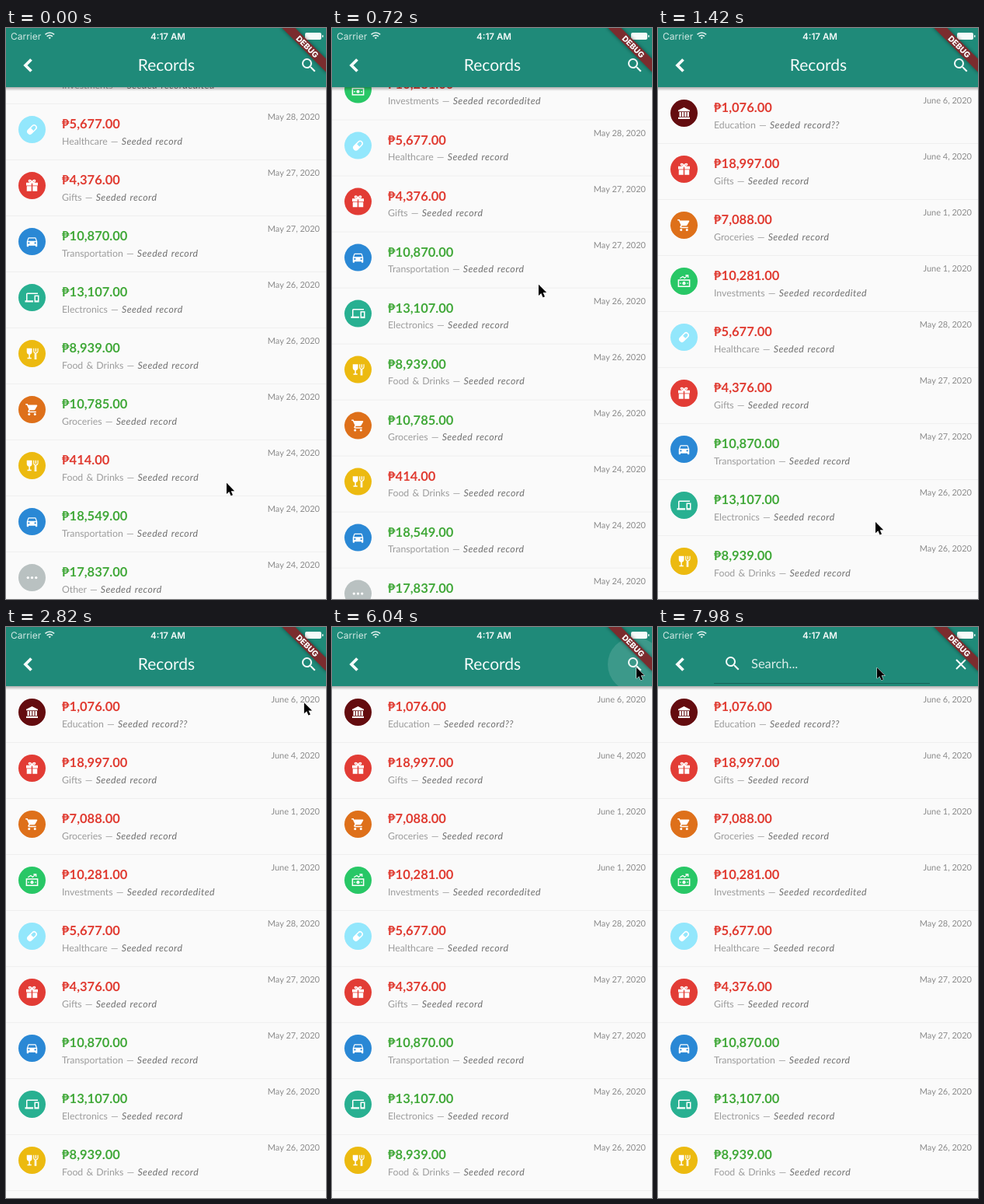
An HTML page for the animation above (8000 ms loop, 412 by 734 pixels).

```html
<!DOCTYPE html>
<html lang="en">
<head>
<meta charset="utf-8">
<title>Records</title>
<style>
  html, body { margin: 0; width: 100%; height: 100%; overflow: hidden; background: #fafafa; }
  svg { display: block; width: 412px; height: 734px; }
  text { font-family: Lato, "Open Sans", sans-serif; text-rendering: geometricPrecision; white-space: pre; }
  .amount { font-size: 16.5px; font-weight: 700; }
  .note { font-size: 12.3px; word-spacing: 1px; fill: #9c9c9c; }
  .note .desc { font-style: italic; letter-spacing: .45px; fill: #727272; }
  .date { font-size: 11px; fill: #8b8b8b; text-anchor: end; }
  .status { font-family: Inter, Roboto, sans-serif; }
  .banner { filter: drop-shadow(0 0 2.5px #0007); }
</style>
</head>
<body>
<svg viewBox="0 0 412 734" xmlns="http://www.w3.org/2000/svg">
  <defs>
    <linearGradient id="shade" x2="0" y2="1">
      <stop stop-color="#000" stop-opacity=".3"/>
      <stop offset="1" stop-color="#000" stop-opacity="0"/>
    </linearGradient>
    <clipPath id="bar"><path d="M0 0H412V76H0z"/></clipPath>
    <path id="magnifier" d="M15.5 14h-.79l-.28-.27A6.47 6.47 0 0 0 16 9.5 6.5 6.5 0 1 0 9.5 16c1.61 0 3.09-.59 4.23-1.57l.27.28v.79l5 4.99L20.49 19zm-6 0a4.5 4.5 0 1 1 0-9 4.5 4.5 0 0 1 0 9z"/>
  </defs>
  <rect width="412" height="734" fill="#fafafa"/>
  <g id="list"></g>

  <rect y="76" width="412" height="5" fill="url(#shade)"/>
  <rect width="412" height="76" fill="#1f8a79"/>
  <g fill="#f6fbfa">
    <path d="M32.5 40.5L25 48l7.5 7.5" fill="none" stroke="#f6fbfa" stroke-width="3.8"/>
    <circle id="ripple" cx="390" cy="48" r="35" fill="#fff" clip-path="url(#bar)"/>
    <g id="titleBar">
      <text x="206.5" y="55" font-size="21" text-anchor="middle">Records</text>
      <use href="#magnifier" x="378" y="36"/>
    </g>
    <g id="searchBar">
      <use href="#magnifier" x="84" y="35"/>
      <text x="120" y="53" font-size="16.5" fill="#dceeea">Search...</text>
      <path d="M72 72.5H350" stroke="#176257"/>
      <path d="M384 42l12 12M396 42l-12 12" stroke="#f6fbfa" stroke-width="2"/>
    </g>
    <text class="status" x="6" y="14.5" font-size="12" fill="#d0e8e3">Carrier</text>
    <text class="status" x="208.5" y="14.5" font-size="11.6" font-weight="600" text-anchor="middle">4:17 AM</text>
    <g fill="none" stroke="#e0f1ee" stroke-width="1.7">
      <path d="M50.5 8.4a8.2 8.2 0 0 1 11.6 0M52.7 10.8a5.1 5.1 0 0 1 7.2 0"/>
      <path d="M56.3 14.2l-1.6-1.7a2.3 2.3 0 0 1 3.2 0z" fill="#e0f1ee" stroke="none"/>
    </g>
    <rect x="385" y="6" width="21" height="9" rx="2"/>
    <rect x="407" y="9" width="1.5" height="3" rx=".7"/>
  </g>
  <g transform="translate(412) rotate(45)">
    <rect class="banner" x="-42" y="28" width="84" height="12" fill="#7b2c2e"/>
    <text class="status" y="37.7" font-size="10.2" font-weight="800" fill="#fff" text-anchor="middle">DEBUG</text>
  </g>
  <path id="pointer" d="M0 0V14.2L3.3 11.2 5.6 16.4 8 15.4 5.7 10.3H10.2z" fill="#000" stroke="#fff" stroke-width="1" paint-order="stroke"/>
</svg>
<script>
const $ = id => document.getElementById(id);
const LOOP = 8000;
const RED = '#e03a30', GREEN = '#40a838';

// Icons are drawn on a 24 unit grid; `c` is the circle colour behind them.
const kinds = {
  'Education': ['#640c0f', c => `<path d="M12 2L2 7v2h20V7zM4 10h3v8H4zm4.5 0h3v8h-3zm4.5 0h3v8h-3zm4.5 0h3v8h-3zM2 19h20v3H2z"/>`],
  'Gifts': ['#e23c35', c => `<path d="M2 7H11V12H2zM13 7H22V12H13zM3 13H11V21.5H3zM13 13H21V21.5H13z"/>
    <path d="M12 6.5C6 7 5.5 2.500 8 2.500s4 4 4 4 1.500-4 4-4 2 4.500-4 4z" fill="none" stroke="#fff" stroke-width="2"/>`],
  'Groceries': ['#de701a', c => `<circle cx="7" cy="20" r="2"/><circle cx="17" cy="20" r="2"/>
    <path d="M1 2v2h2l3.6 7.6-1.35 2.44C4.5 15.4 5.5 17 7 17h12v-2H7.4l.8-2h7.35c.75 0 1.4-.4 1.75-1l3.6-6.5A1 1 0 0 0 20 4H5.2l-.94-2z"/>`],
  'Investments': ['#28c766', c => `<rect x="2.5" y="10" width="19" height="11" fill="none" stroke="#fff" stroke-width="2"/>
    <circle cx="12" cy="15.5" r="2.8"/><path d="M5 15.5h2M17 15.5h2M5 7l5-3 3 2.5 5-4M14.5 2H19V6" fill="none" stroke="#fff" stroke-width="1.7"/>`],
  'Healthcare': ['#93e7fc', c => `<g transform="rotate(-45 12 12)"><rect x="2" y="7" width="20" height="10" rx="5"/>
    <path d="M12.5 9H17a3 3 0 0 1 0 6h-4.5z" fill="${c}"/></g>`],
  'Transportation': ['#2a88d5', c => `<path d="M18.9 6A1.5 1.5 0 0 0 17.5 5h-11A1.5 1.5 0 0 0 5.1 6L3 12v8q0 1 1 1h1q1 0 1-1v-1h12v1q0 1 1 1h1q1 0 1-1v-8z"/>
    <path d="M5 11l1.5-4.5h11L19 11z" fill="${c}"/><circle cx="6.5" cy="14.5" r="1.5" fill="${c}"/><circle cx="17.5" cy="14.5" r="1.5" fill="${c}"/>`],
  'Electronics': ['#28b091', c => `<path d="M4 6h18V4H4Q2 4 2 6v11H0v3h14v-3H4z"/>
    <rect x="17" y="9" width="6" height="10" fill="none" stroke="#fff" stroke-width="2"/><path d="M17 17h6v2h-6z"/>`],
  'Food &amp; Drinks': ['#ecba10', c => `<path d="M3 3h9v6q0 4-3.5 4.5V19H11v2H4v-2h2.5v-5.5Q3 13 3 9z"/>
    <path d="M15 3v5q0 2.5 2 3v10h2V11q3-.5 3-3V3M18.5 3v6" fill="none" stroke="#fff" stroke-width="1.6"/>`],
  'Other': ['#b9c1c1', c => [5, 12, 19].map(x => `<circle cx="${x}" cy="12" r="2.2"/>`).join('')]
};

const records = [
  ['Education', '1,076', 'June 6', RED, '??'],
  ['Gifts', '18,997', 'June 4', RED],
  ['Groceries', '7,088', 'June 1', RED],
  ['Investments', '10,281', 'June 1', RED, 'edited'],
  ['Healthcare', '5,677', 'May 28', RED],
  ['Gifts', '4,376', 'May 27', RED],
  ['Transportation', '10,870', 'May 27', GREEN],
  ['Electronics', '13,107', 'May 26', GREEN],
  ['Food &amp; Drinks', '8,939', 'May 26', GREEN],
  ['Groceries', '10,785', 'May 26', GREEN],
  ['Food &amp; Drinks', '414', 'May 24', RED],
  ['Transportation', '18,549', 'May 24', GREEN],
  ['Other', '17,837', 'May 24', GREEN]
];

$('list').innerHTML = records.map(([kind, amount, day, color, suffix = ''], i) => {
  const [fill, icon] = kinds[kind];
  return `<g transform="translate(0 ${76 + 72 * i})">
    <path d="M0 72.5H412" stroke="#efefef"/>
    <circle cx="33.5" cy="33.5" r="17.5" fill="${fill}"/>
    <g transform="translate(24.5 24.5) scale(.75)" fill="#fff">${icon(fill)}</g>
    <text class="amount" x="72" y="32" fill="${color}">₱${amount}.00</text>
    <text class="note" x="72" y="52.5">${kind} — <tspan class="desc">Seeded record${suffix}</tspan></text>
    <text class="date" x="404" y="21">${day}, 2020</text>
  </g>`;
}).join('');

// time, x, y of the pointer tip
const path = [
  [0, 284, 585], [150, 281, 560], [450, 271, 425], [720, 266, 330], [800, 265, 312],
  [880, 267, 345], [1040, 272, 470], [1180, 276, 577], [1300, 279, 625], [1420, 280, 635],
  [1660, 282, 635], [1900, 308, 500], [2180, 352, 220], [2400, 383, 98],
  [2900, 384, 97], [3300, 390, 66], [3600, 393, 52], [5300, 393, 52], [5600, 392, 52],
  [6260, 392, 52], [6450, 372, 53], [6750, 305, 53], [6960, 282, 52], [LOOP, 282, 52]
];
const DRAG_START = 800, DRAG_END = 1420, PRESS = 5860, OPEN = 6140;
const clamp = (v, lo, hi) => Math.min(hi, Math.max(lo, v));

function pointerAt(t) {
  const i = path.findIndex(p => p[0] > t);
  const [t0, x0, y0] = path[i - 1], [t1, x1, y1] = path[i];
  const k = (t - t0) / (t1 - t0);
  return [x0 + (x1 - x0) * k, y0 + (y1 - y0) * k];
}

// The list coasts to rest, then follows a downward drag to its top.
function scrollAt(t, y) {
  const coast = -240 - 27 * Math.exp(-t / 500);
  if (t < DRAG_START) return coast;
  return t > DRAG_END ? 0 : clamp(y - 576, coast, 0);
}

function draw(t) {
  const [x, y] = pointerAt(t);
  const press = clamp((t - PRESS) / 180, 0, 1) * clamp(1 - (t - OPEN) / 300, 0, 1);
  const open = t >= OPEN;
  $('pointer').setAttribute('transform', `translate(${x} ${y})`);
  $('list').setAttribute('transform', `translate(0 ${scrollAt(t, y)})`);
  $('ripple').setAttribute('opacity', 0.13 * press);
  $('titleBar').style.display = open ? 'none' : '';
  $('searchBar').style.display = open ? '' : 'none';
}

const start = performance.now();
function tick() {
  draw((performance.now() - start) % LOOP);
  requestAnimationFrame(tick);
}
tick();
</script>
</body>
</html>
```
